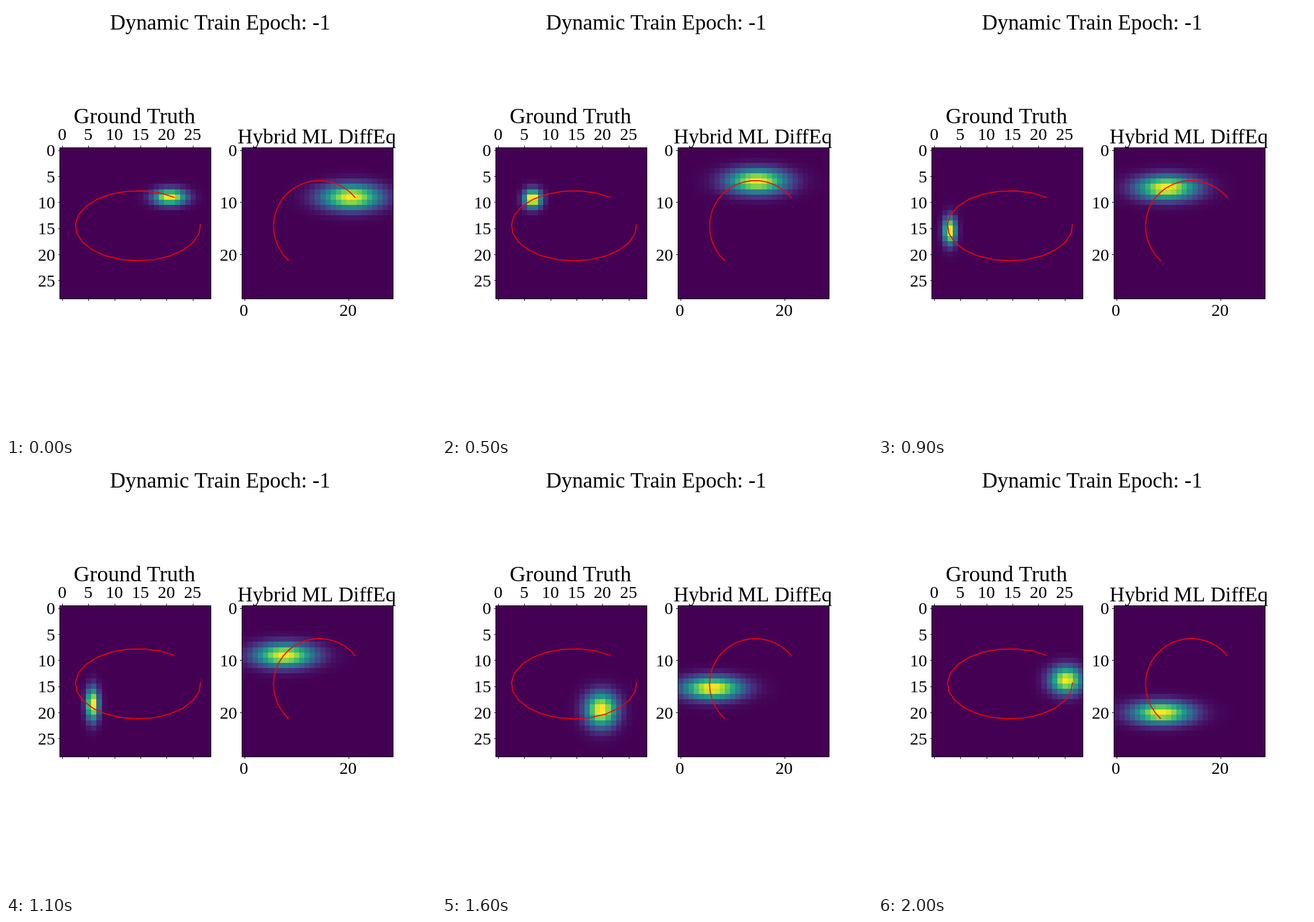
An HTML page with a canvas for the animation above (2.1 s loop, 748 by 748 pixels).

```html
<!DOCTYPE html>
<html lang="en">
<head>
<meta charset="utf-8">
<title>Dynamic Train</title>
<style>
html, body { margin: 0; width: 100%; height: 100%; overflow: hidden; background: #fff; }
canvas { display: block; }
</style>
</head>
<body>
<canvas id="stage" width="748" height="748"></canvas>
<script>
const ctx = document.getElementById('stage').getContext('2d');
const N = 29, SIZE = 263, CELL = SIZE / N, TOP = 246.5, STEPS = 21, STEP_MS = 100;
const VIRIDIS = ['440154', '482878', '3e4a89', '31688e', '26828e', '1f9e89', '35b779', '6dcd59', 'b4de2c', 'fde725']
  .map(h => [0, 2, 4].map(i => parseInt(h.slice(i, i + 2), 16)));

const mix = (a, b, u) => a + (b - a) * u;

function viridis(v) {
  const p = v * (VIRIDIS.length - 1), i = Math.min(Math.floor(p), VIRIDIS.length - 2);
  return `rgb(${VIRIDIS[i].map((c, k) => Math.round(mix(c, VIRIDIS[i + 1][k], p - i)))})`;
}

// Piecewise linear value through [step, value] pairs.
function ramp(keys, k) {
  let i = 0;
  while (i < keys.length - 2 && keys[i + 1][0] <= k) i++;
  const [a, va] = keys[i], [b, vb] = keys[i + 1];
  return mix(va, vb, (k - a) / (b - a));
}

// Orbits and blobs are given in grid units.
function orbit(degrees, rx, ry) {
  const a = degrees * Math.PI / 180;
  return [14.45 + rx * Math.cos(a), 14.48 - ry * Math.sin(a)];
}

const spreadX = [[0, 2.1], [3, 1.4], [7, .85], [11, .82], [13, 1.3], [16, 2.05], [20, 2.1]];
const spreadY = [[0, 1.03], [3, .92], [7, 1.45], [11, 2.1], [13, 2.4], [16, 2.2], [20, 1.75]];

const truth = {
  left: 94,
  path: k => orbit(54 + 15.42 * k, 12, 6.73),
  blob(k) {
    const [x, y] = this.path(k);
    return [.94 * x + .35, .94 * y + .48, ramp(spreadX, k), ramp(spreadY, k)];
  }
};
const hybrid = {
  left: 410.5,
  path: k => orbit(38.8 + 9.46 * k, 8.75 + .01 * k, 8.55 + .023 * k),
  blob(k) {
    const [x, y] = this.path(k);
    return [.92 * x + .85, .92 * y + .62, 3.9, mix(1.62, 1.42, k / 20)];
  }
};

const at = (origin, i) => origin + (i + .5) * CELL;
const edge = (origin, i) => Math.round(origin + i * CELL);

function text(s, x, y, size, align = 'center') {
  ctx.font = `${size}px "Liberation Serif", "Times New Roman", serif`;
  ctx.textAlign = align;
  ctx.fillStyle = '#000';
  ctx.fillText(s, x, y);
}

function heatmap(left, [cx, cy, sx, sy]) {
  const top = Math.floor(TOP);
  const bell = (i, c, s) => Math.exp(-((i - c) ** 2) / (2 * s * s));
  const peak = bell(Math.round(cx), cx, sx) * bell(Math.round(cy), cy, sy);
  for (let r = 0; r < N; r++) {
    const y = edge(top, r), h = edge(top, r + 1) - y;
    for (let c = 0; c < N; c++) {
      const x = edge(left, c), w = edge(left, c + 1) - x;
      ctx.fillStyle = viridis(Math.min(1, bell(c, cx, sx) * bell(r, cy, sy) / peak));
      ctx.fillRect(x, y, w, h);
    }
  }
}

function panel(p, k) {
  heatmap(p.left, p.blob(k));
  ctx.beginPath();
  for (let i = 0; i < STEPS; i++) {
    const [x, y] = p.path(i);
    ctx.lineTo(at(p.left, x), at(TOP, y));
  }
  ctx.strokeStyle = '#f00';
  ctx.lineWidth = 1.7;
  ctx.lineJoin = 'round';
  ctx.stroke();
  const x0 = Math.ceil(p.left) - .5, x1 = Math.ceil(p.left + SIZE) - .5;
  ctx.strokeStyle = '#000';
  ctx.lineWidth = 1;
  ctx.strokeRect(x0, TOP, x1 - x0, SIZE);
}

function tick(x, y, w, h) {
  ctx.fillStyle = '#000';
  ctx.fillRect(Math.round(x - .5), Math.round(y - .5), w, h);
}

function axes() {
  for (let v = 0; v <= 25; v += 5) {
    const x = at(truth.left, v), y = at(TOP, v);
    tick(x, TOP - 3, 1, 4);
    tick(x, TOP + SIZE + 1, 1, 3);
    tick(truth.left - 3, y, 4, 1);
    text(v, x - .8, 233, 30);
    text(v, 85.5, y + 10.3, 30, 'right');
  }
  for (let v = 0; v <= 20; v += 10) {
    const y = at(TOP, v);
    tick(hybrid.left - 3, y, 4, 1);
    text(v, 402, y + 10.3, 30, 'right');
  }
  for (const v of [0, 20]) {
    const x = at(hybrid.left, v);
    tick(x, TOP + SIZE + 1, 1, 3);
    text(v, x - 1.3, 539, 30);
  }
}

function draw(now) {
  const k = Math.floor(now / STEP_MS) % STEPS;
  ctx.fillStyle = '#fff';
  ctx.fillRect(0, 0, 748, 748);
  panel(truth, k);
  panel(hybrid, k);
  axes();
  text('Dynamic Train Epoch: -1', 372.5, 40.5, 37.6);
  text('Ground Truth', 223.5, 204, 38.5);
  text('Hybrid ML DiffEq', 540.5, 238.5, 36.3);
  requestAnimationFrame(draw);
}
requestAnimationFrame(draw);
</script>
</body>
</html>
```
